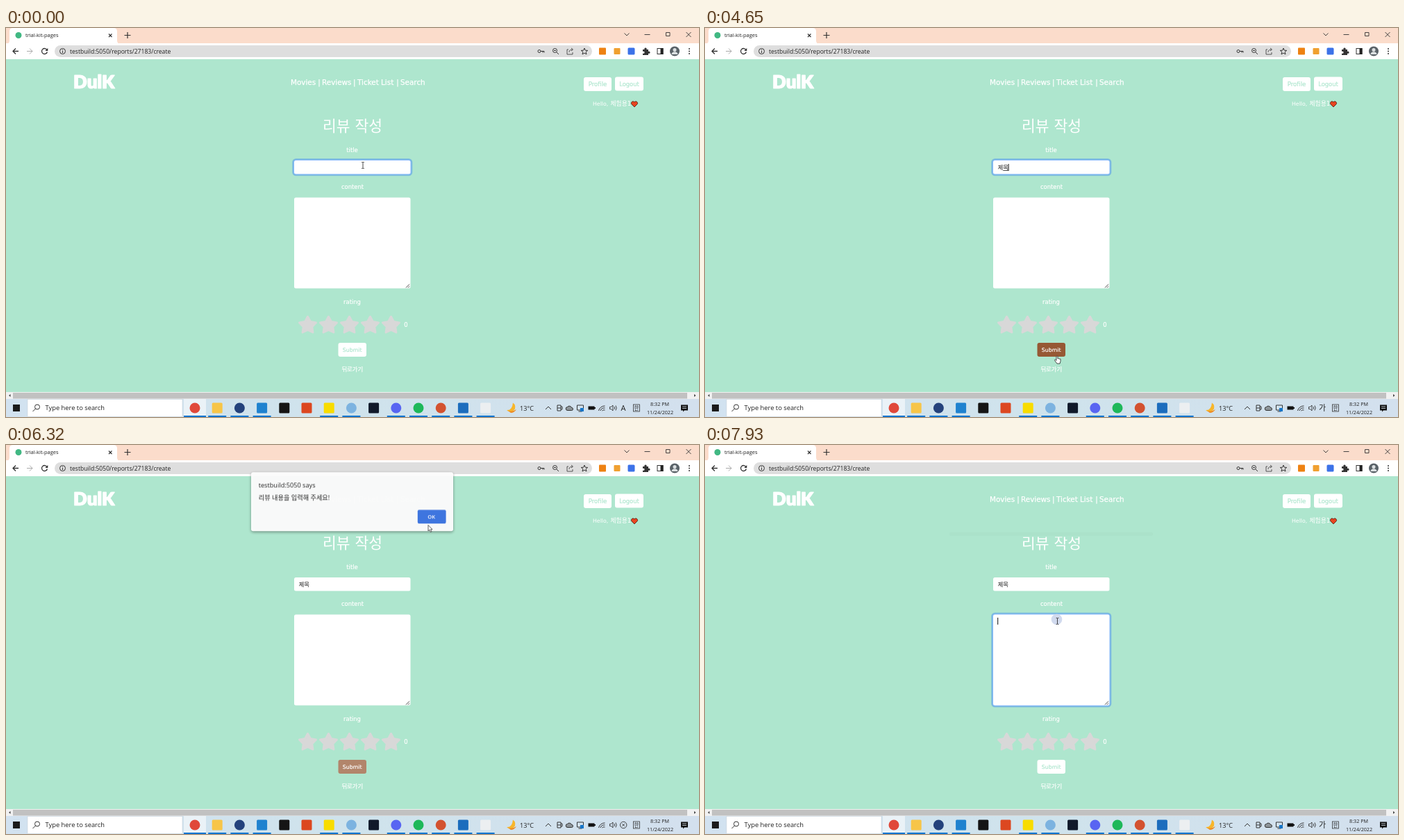
Animation of 998x561 px, one loop 8000 ms. Source, as an HTML page:

```html
<!DOCTYPE html>
<html lang="ko">
<head>
<meta charset="utf-8">
<title>Review form</title>
<style>
html, body { margin: 0; width: 100%; height: 100%; overflow: hidden; background: #aee6ce; }
svg { display: block; width: 100%; height: 100%; }
text { font-family: "Open Sans", "Noto Sans CJK KR", "Noto Sans CJK JP", sans-serif; fill: #222; white-space: pre; }
.page text { font-family: "DejaVu Sans", "Noto Sans CJK KR", "Noto Sans CJK JP", sans-serif; fill: #fff; }
.page .nav text { font-size: 10.4px; stroke: #fff; stroke-width: .25px; }
.page .mid { text-anchor: middle; font-size: 8.4px; stroke: #fff; stroke-width: .2px; }
.page .btn { text-anchor: middle; fill: #aee6ce; stroke: #aee6ce; stroke-width: .2px; }
.page .typed { font-size: 8.3px; fill: #222; }
.line { fill: none; stroke: #333; }
.c { text-anchor: middle; }
</style>
</head>
<body>
<svg viewBox="0 0 998 561" preserveAspectRatio="none">
  <defs>
    <filter id="soft" x="-10%" y="-30%" width="120%" height="160%"><feGaussianBlur stdDeviation="2.2"/></filter>
    <linearGradient id="bar"><stop stop-color="#d2e2f0"/><stop offset=".5" stop-color="#cfe3ec"/><stop offset="1" stop-color="#d3e0ee"/></linearGradient>
  </defs>

  <!-- browser frame -->
  <rect width="998" height="23" fill="#fbdccb"/>
  <path d="M0 23Q5 23 5 18V5Q5 0 10 0H155Q160 0 160 5V18Q160 23 165 23Z" fill="#fff"/>
  <circle cx="18" cy="10.5" r="4.5" fill="#41b883"/>
  <text x="28" y="13.3" font-size="7.5">trial-kit-pages</text>
  <path class="line" d="M148 8.5l4.5 4.5m0-4.5l-4.5 4.5M170.5 10.5h9m-4.5-4.5v9" stroke-width="1.2"/>
  <path class="line" d="M890.5 7.5l3.5 3.5 3.5-3.5M919.5 9.5h8M950.5 6.5h5.5v5h-5.5v-5zM979.5 6l7 7m0-7l-7 7" stroke-width=".9"/>
  <rect y="22" width="998" height="23" fill="#fff"/>
  <path class="line" d="M18 33.5H10m4-4l-4 4 4 4" stroke-width="1.3"/>
  <path class="line" d="M30 33.5h8m-4-4l4 4-4 4" style="stroke:#aaa"/>
  <path class="line" d="M59 31.5a4 4 0 1 0 .4 3" stroke-width="1.3"/>
  <path d="M60.3 29v4h-4z" fill="#333"/>
  <rect x="70" y="25" width="774" height="17" rx="8.5" fill="#dedede"/>
  <circle class="line" cx="81.5" cy="33.5" r="4"/>
  <path class="line" d="M81.5 33v3m0-5v1"/>
  <text x="92" y="36.7" font-size="8.6">testbuild:5050/reports/27183/create</text>
  <g class="line">
    <circle cx="768" cy="33.5" r="2"/><path d="M770 33.5h5v2m-2-2v2"/>
    <circle cx="790.5" cy="32.5" r="3"/><path d="M793 35l3 3m-7-5.5h3"/>
    <path d="M810 31h-2v7h8v-3m-5 0q0-4 5-4m-2-2l2.5 2-2.5 2" stroke="#555"/>
    <path d="M833 29l1.3 3.2 3.4.2-2.6 2.2.9 3.4-3-1.9-3 1.9.9-3.4-2.6-2.2 3.4-.2z"/>
  </g>
  <rect x="854" y="28.5" width="10" height="10" rx="1" fill="#ee8212"/>
  <rect x="875.5" y="29" width="9" height="9" rx="1" fill="#f0a030"/>
  <rect x="895.5" y="28.5" width="10" height="10" rx="1.5" fill="#3c72e8"/>
  <path d="M917 31h2.5a1.7 1.7 0 1 1 3 0H925v3a1.6 1.6 0 1 1 0 2.5V39h-8v-2.5a1.6 1.6 0 1 0 0-2.5z" fill="#333"/>
  <rect class="line" x="938" y="29.5" width="8" height="8"/><rect x="942.5" y="29" width="4" height="9" fill="#222"/>
  <circle cx="963" cy="33.5" r="7" fill="#5a6268"/>
  <circle cx="963" cy="31.5" r="2.5" fill="#dce0e2"/><path d="M958.5 38a4.5 3.8 0 0 1 9 0z" fill="#dce0e2"/>
  <g fill="#333"><circle cx="984" cy="30" r="1"/><circle cx="984" cy="33.5" r="1"/><circle cx="984" cy="37" r="1"/></g>

  <!-- page -->
  <g class="page">
    <rect y="45" width="998" height="480" fill="#aee6ce"/>
    <text x="97" y="86.5" style="font:900 26px Lato,sans-serif;stroke:#fff;stroke-width:1.2px;stroke-linejoin:round">DulK</text>
    <g class="nav">
      <text x="410" y="82">Movies</text><text x="449.3" y="82">|</text>
      <text x="455" y="82">Reviews</text><text x="500" y="82">|</text>
      <text x="506" y="82">Ticket List</text><text x="562.3" y="82">|</text>
      <text x="568" y="82">Search</text>
    </g>
    <rect x="832" y="71" width="40" height="20" rx="3" fill="#fff"/>
    <text class="btn" x="852" y="84" font-size="8.6">Profile</text>
    <rect x="877" y="70.5" width="41" height="20" rx="3" fill="#fff"/>
    <text class="btn" x="897.5" y="83.5" font-size="8.4">Logout</text>
    <text x="845" y="112.3" font-size="7.8">Hello,</text>
    <text x="870.5" y="112.3" font-size="8.8">체험용1</text>
    <path d="M905 114l-4.2-4.2c-1.5-2.5 1.8-5.5 4.2-3 2.4-2.5 5.7.5 4.2 3z" fill="#e8441f" stroke="#4a2018" stroke-width=".8"/>
    <text x="499" y="148.5" text-anchor="middle" font-size="21.5">리뷰 작성</text>
    <g id="trim"><rect x="450" y="128" width="98" height="4.5" fill="#aee6ce"/><rect x="352" y="126" width="293" height="5" rx="2" fill="#000" opacity=".018"/></g>
    <text class="mid" x="498.5" y="179">title</text>
    <g id="ring1"><rect/><rect/></g>
    <rect x="415" y="191" width="167.5" height="19.5" rx="2.5" fill="#fff"/>
    <text class="typed" id="typed" x="421.7" y="203.5"></text>
    <rect id="under" y="205" width="7.5" height=".8" fill="#222"/>
    <text class="mid" x="499" y="232">content</text>
    <g id="ring2"><rect/><rect/></g>
    <rect x="415" y="244.5" width="167.5" height="131" rx="2.5" fill="#fff"/>
    <path class="line" d="M576 374.5l5-5m-2 5l2-2" stroke-width=".9"/>
    <circle id="spot" cx="506.5" cy="251.5" r="7.8" fill="#d1daee"/>
    <rect id="caret" width="1" height="10" fill="#111"/>
    <text class="mid" x="498.5" y="397.5">rating</text>
    <g id="stars" fill="#d8d8d8" stroke="#d8d8d8" stroke-width="3" stroke-linejoin="round"></g>
    <text class="mid" x="576" y="430.5">0</text>
    <rect id="send" x="478.5" y="454" width="40.5" height="20" rx="3"/>
    <text class="btn" id="sendText" x="498.7" y="466.5" font-size="7.8">Submit</text>
    <text class="mid" x="498.8" y="495">뒤로가기</text>
  </g>
  <rect y="525" width="998" height="10" fill="#f1f1f1"/>
  <rect x="10" y="526" width="971" height="8.5" fill="#c1c1c1"/>
  <path d="M6.5 528v4l-2.5-2zM991 528v4l2.5-2z" fill="#444"/>

  <!-- taskbar -->
  <rect y="535" width="998" height="26" fill="url(#bar)"/>
  <rect x="10" y="543" width="10" height="10" fill="#1b1b1b"/>
  <rect x="31" y="535.5" width="223" height="25" fill="#fff" stroke="#c9d2da" stroke-width=".6"/>
  <circle class="line" cx="45" cy="546.5" r="3.5"/><path class="line" d="M42.5 549l-4 4"/>
  <text x="56.5" y="551.4" font-size="9.35">Type here to search</text>
  <rect x="256" y="535" width="32" height="26" fill="#eaf2f7"/>
  <g id="apps"></g>
  <path d="M730 540.5a7 7 0 1 1-9 10.5q8 1 9-10.5z" fill="#f8b62a"/><path d="M727 555q5 0 8-5-6 4-12 2z" fill="#ee8a20"/>
  <text x="740" y="551.5" font-size="9.1">13°C</text>
  <g class="line">
    <path d="M777 550l4-4 4 4"/>
    <path d="M794 544h5v8h-5zm5 2h2v4h-2m-5-2h5"/>
    <path d="M809 551.5h5.5a2 2 0 0 0 0-4 3.5 3.5 0 0 0-6-1 2.5 2.5 0 0 0 .5 5z" style="fill:#8d9499"/>
    <path d="M822.5 544h9v7h-9zm2 9h5"/>
    <path d="M853.5 552a9 9 0 0 1 9-7m-6.5 7a6 6 0 0 1 6.5-4m-4 4a4 4 0 0 1 4-1"/>
    <path d="M869.5 546.5h2l2.5-2.5v8l-2.5-2.5h-2zm6.5-.5q1.5 2 0 4m2-5.5q2.5 3.5 0 7" stroke-width=".9"/>
    <rect x="903.5" y="543" width="9" height="10" stroke-width=".8"/>
  </g>
  <rect x="827" y="548" width="5" height="5" fill="#1675c8"/>
  <path d="M838.5 545.5h9v5h-9zM847.5 547h1.5v2h-1.5z" fill="#111"/>
  <text class="c" x="908" y="550.7" font-size="7.5">한</text>
  <text class="c" id="ime" x="889" y="552" font-size="11"></text>
  <path class="line" id="off" d="M884.5 548a4.7 4.7 0 1 0 9.4 0a4.7 4.7 0 1 0-9.4 0m2.9-1.8l3.6 3.6m0-3.6l-3.6 3.6" stroke-width=".9"/>
  <text class="c" x="941.5" y="544.8" font-size="7.2">8:32 PM</text>
  <text class="c" x="942" y="556.5" font-size="7.2">11/24/2022</text>
  <path d="M972 543.5h10v8h-5l-2 2v-2h-3z" fill="#111"/><path d="M974 546h6m-6 2.5h6" stroke="#dce6ee" stroke-width=".8"/>

  <!-- alert -->
  <g id="alert">
    <g id="shade"><rect x="353" y="44.5" width="291" height="85" rx="3" fill="#000" opacity=".38" filter="url(#soft)"/></g>
    <rect id="panel" x="353" y="43" width="291" height="85" rx="3" fill="#fff"/>
    <g id="words">
      <text x="363.7" y="65" font-size="9.2">testbuild:5050 says</text>
      <text x="363.7" y="83.3" font-size="9.2">리뷰 내용을 입력해 주세요!</text>
      <rect id="okRing" x="591.7" y="96.2" width="42.8" height="21.6" rx="3" fill="#fff" stroke="#3b73df" stroke-width="1.2"/>
      <rect x="592.8" y="97.2" width="40.8" height="19.8" rx="2" fill="#3b73df"/>
      <text class="c" x="612.8" y="109.8" font-size="7.7" font-weight="600" style="fill:#fff">OK</text>
    </g>
  </g>

  <g id="mouse">
    <path id="beam" d="M-1.8-4.5H-.5L0-4 .5-4.5H1.8M0-4V4M-1.8 4.5H-.5L0 4 .5 4.5H1.8" class="line" stroke-width=".9"/>
    <path id="arrow" d="M0 0V8.5L2 6.7 3.4 10 5 9.2 3.6 6.2H6Z" fill="#fff" stroke="#222" stroke-width=".7"/>
    <path id="hand" d="M-1 1V6.5L-2.5 5.3C-3.6 5-3.8 6-3.2 6.8L0 11H4L5 7.5V4.8C5 4 4 3.8 3.8 4.4 3.6 3.6 2.4 3.5 2.3 4.1 2 3.4 1 3.4 1 3.9V1C1-.2-1-.2-1 1Z" fill="#fff" stroke="#222" stroke-width=".8"/>
  </g>
</svg>
<script>
const LOOP = 8000;
const $ = id => document.getElementById(id);
const set = (el, o) => { for (const k in o) el.setAttribute(k, o[k]); };
const show = (id, on) => set($(id), { visibility: on ? "visible" : "hidden" });
const add = (parent, tag, o) => {
  const el = document.createElementNS("http://www.w3.org/2000/svg", tag);
  set(el, o);
  parent.append(el);
};

for (let i = 0; i < 5; i++) {
  let pts = "";
  for (let k = 0; k < 10; k++) {
    const r = k % 2 ? 6.6 : 12.6, a = k * Math.PI / 5;
    pts += `${434.5 + 30 * i + r * Math.sin(a)},${428.8 - r * Math.cos(a)} `;
  }
  add($("stars"), "polygon", { points: pts });
}

// one plain shape per app: colour, round?, running?
[["#e0483a", 1, 1], ["#f7c548", 0, 1], ["#24427c", 1, 1], ["#1f82cf", 0, 1], ["#151515", 0, 0],
 ["#dc4720", 0, 0], ["#f8dc00", 0, 1], ["#7cb3e0", 1, 1], ["#10192a", 0, 0], ["#5865f2", 1, 1],
 ["#1eb85a", 1, 1], ["#d35230", 1, 1], ["#1c6dbd", 0, 1], ["#eceff1", 0, 1]
].forEach(([fill, round, runs], i) => {
  const x = 272 + 32.2 * i, w = i ? 26 : 32;
  add($("apps"), "rect", { x: x - 7.5, y: 540.5, width: 15, height: 15, rx: round ? 7.5 : 1.5, fill });
  if (runs) add($("apps"), "rect", { x: x - w / 2, y: 559, width: w, height: 2, fill: "#0a74cf" });
});

// last value whose time has come
const at = (list, t) => list.reduce((v, e) => t >= e[0] ? e[1] : v, list[0][1]);

// linear between points [time, ...values]
function track(list, t) {
  const i = list.findIndex(p => p[0] > t);
  if (i === 0) return list[0].slice(1);
  if (i < 0) return list[list.length - 1].slice(1);
  const a = list[i - 1], b = list[i], k = (t - a[0]) / (b[0] - a[0]);
  return a.slice(1).map((v, j) => v + (b[j + 1] - v) * k);
}

// bursts of movement [start, end, steps]: the picture holds in between
const bursts = [[3910, 4380, 8], [4650, 4840, 4], [4980, 5780, 13], [5840, 6590, 12], [6660, 6660, 1], [6840, 7130, 5]];
function hold(t) {
  let s = 0;
  for (const [a, b, n] of bursts) {
    const d = (b - a) / (n - 1 || 1) || 1;
    if (t >= a - 8) s = Math.min(b, a + Math.floor((t - a + 8) / d) * d);
  }
  return s;
}

const typing = [[0, ""], [1830, "w"], [1900, "wp"], [2360, "w"], [2500, ""], [2800, "ㅈ"], [2900, "제"],
  [3000, "젬"], [3100, "제모"], [3240, "제목"]];
const ends = { "": 421.7, w: 428.2, wp: 433.2, "제모": 436.8, "제목": 436.8 };
const blink = [[0, 0], [510, 1], [1040, 0], [1570, 1], [3760, 0], [4290, 1], [4820, 0], [6840, 1], [7400, 0], [7930, 1]];
const ime = [[0, "A"], [2700, "가"], [5172, ""], [6832, "가"]];
const path = [[3840, 514, 198], [3980, 524, 235], [4110, 536, 320], [4250, 528, 420], [4380, 508, 474],
  [4650, 507, 473], [4840, 501, 466.5], [5180, 501, 466.5], [5446, 498, 449.5], [5650, 530, 330], [5840, 575, 210],
  [6050, 609, 112], [6180, 608, 115.5], [6320, 608, 115.5], [6450, 570, 190], [6590, 511, 251],
  [6660, 507.5, 251], [6912, 507.5, 251.5], [7130, 507.5, 254]];
const fade = [[5046, 0], [5113, .35], [5180, .65], [5313, 1], [6250, 1], [6317, .985], [6385, .55], [6453, .15], [6520, 0]];
const drop = [[5046, -13], [5113, -10], [5180, -6], [5313, 0], [6250, 0], [6317, -3.7], [6453, -10]];
const hover = [[4240, 0], [4380, 1], [6250, 1], [6500, 0]];
const glow1 = [[4980, 1], [5046, .5], [5113, .2], [6250, .2], [6317, 0]];
const glow2 = [[6840, 0], [6912, .2], [6985, .8], [7057, 1]];

const green = [174, 230, 206], brown = [150, 88, 52], white = [255, 255, 255];
const mix = (a, b, k) => `rgb(${a.map((v, i) => Math.round(v + (b[i] - v) * k))})`;

function ring(id, y, h, v) {
  const [halo, edge] = $(id).children, g = 2.3 * v;
  set(halo, { x: 414.5 - g, y: y - .5 - g, width: 168.5 + 2 * g, height: h + 1 + 2 * g, rx: 3 + g, fill: "#4a90f0", opacity: v ? .5 : 0 });
  set(edge, { x: 414.5, y: y - .5, width: 168.5, height: h + 1, rx: 3, fill: "#86b7fe", stroke: "#86b7fe", "stroke-width": .8, opacity: Math.min(1, v * 4) });
}

function pointer(t, x, y) {
  if (t >= 4980 && t < 5560) return "hand";
  if (t >= 5560 && t < 6400) return "arrow";
  const inside = (l, top, r, b) => x > l && x < r && y > top && y < b;
  if (inside(415, 191, 583, 211) || inside(415, 244, 583, 376)) return "beam";
  return inside(478, 454, 519, 475) ? "hand" : "arrow";
}

function draw(t) {
  const s = hold(t);

  const word = at(typing, t), last = ends[word] || 429.3;
  $("typed").textContent = word;
  show("under", t >= 2800 && s < 4980);
  set($("under"), { x: last - 7.6 });
  show("caret", at(blink, t + 5) && (s < 4980 || s >= 6840));
  set($("caret"), s < 4980 ? { x: last - .2, y: 196 } : { x: 421.2, y: 249 });

  ring("ring1", 191, 19.5, track(glow1, s)[0]);
  ring("ring2", 244.5, 131, track(glow2, s)[0]);
  show("spot", s >= 6840);

  const h = track(hover, s)[0];
  const label = mix(green, white, Math.min(1, h * 2));
  set($("send"), { fill: mix(white, brown, h) });
  $("sendText").style.fill = $("sendText").style.stroke = label;

  const p = track(fade, s)[0];
  show("alert", p > 0);
  set($("alert"), { transform: `translate(0 ${track(drop, s)[0]})` });
  set($("shade"), { opacity: p });
  set($("panel"), { opacity: p ** 3 });
  set($("words"), { opacity: p });
  set($("okRing"), { opacity: s < 6180 ? 1 : 0 });
  show("trim", s >= 5300 && s < 6250 || s >= 6385);

  const mode = at(ime, t);
  $("ime").textContent = mode;
  show("off", !mode);

  const [x, y] = track(path, s), kind = pointer(s, x, y);
  set($("mouse"), { transform: `translate(${x} ${y})` });
  for (const k of ["beam", "arrow", "hand"]) show(k, k === kind);
}

function tick(now) {
  draw(now % LOOP);
  requestAnimationFrame(tick);
}
draw(0);
requestAnimationFrame(tick);
</script>
</body>
</html>
```
